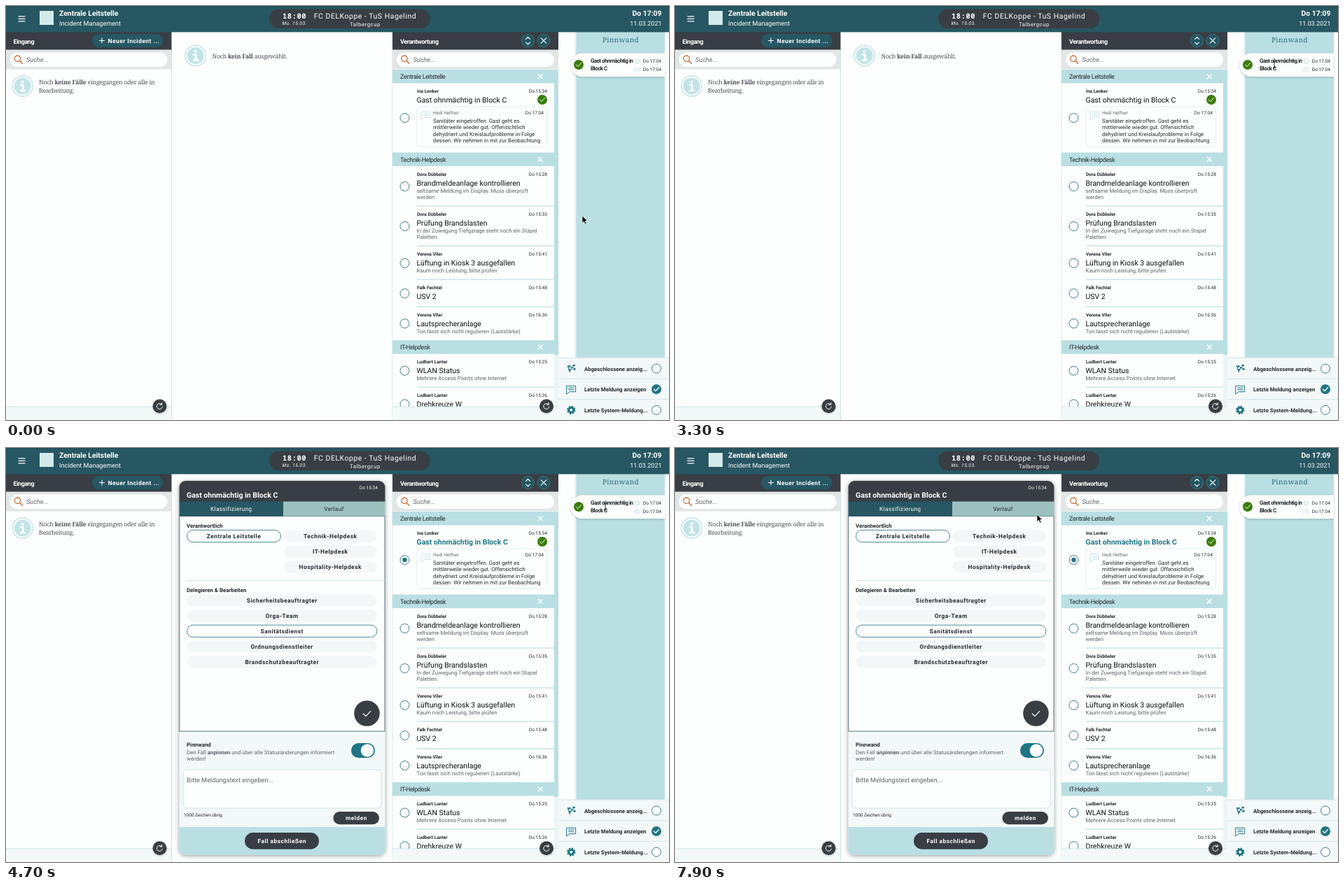
An HTML page that plays this animation: 947x592 px, repeating every 8 s.

```html
<!DOCTYPE html>
<html lang="de">
<head>
<meta charset="utf-8">
<title>Incident Management</title>
<style>
html, body { margin: 0; width: 100%; height: 100%; overflow: hidden; background: #fdfefe; }
svg { display: block; width: 100vw; height: 100vh; font-family: Roboto, Arial, sans-serif; fill: #23292d; text-rendering: geometricPrecision; }
.b { font-weight: 700; }
.i { font-style: italic; }
.m { text-anchor: middle; }
.e { text-anchor: end; }
.w { fill: #fff; }
.g { fill: #5d6468; }
.serif { font-family: "Noto Serif", serif; font-size: 8.7px; letter-spacing: -.24px; fill: #4c5357; }
.head { font-size: 9px; letter-spacing: -.42px; }
.band { font-size: 9px; letter-spacing: -.36px; }
.pin { font-size: 8px; letter-spacing: -.52px; }
.btn { font-size: 8.4px; letter-spacing: .5px; }
.title { font-size: 10.5px; fill: #0c0f11; }
.text { font-size: 7.85px; }
.small { font-size: 6.6px; }
.line { fill: none; stroke-linecap: round; stroke-linejoin: round; }
.sh { filter: drop-shadow(0 1px 1.5px rgba(0, 0, 0, .2)); }
.deep { filter: drop-shadow(0 1.5px 3px rgba(0, 0, 0, .4)); }

.before, .after, .first, .full, .body, .arrow, .beam { animation: 8s step-end infinite; }
.before { animation-name: before; }
.after { animation-name: after; }
.first { animation-name: first; }
.full { animation-name: full; }
.body { animation-name: body; }
.beam { animation-name: beam; }
.arrow { animation-name: move, arrow; }
@keyframes before { 0% { visibility: visible } 56.25%, 100% { visibility: hidden } }
@keyframes after { 0% { visibility: hidden } 56.25%, 100% { visibility: visible } }
@keyframes first { 0% { visibility: hidden } 56.25% { visibility: visible } 58.75%, 100% { visibility: hidden } }
@keyframes full { 0% { visibility: hidden } 58.75%, 100% { visibility: visible } }
@keyframes body { 0% { transform: none } 58.75%, 100% { transform: translateY(21px) } }
@keyframes beam { 0% { visibility: hidden } 31.25% { visibility: visible } 81.25%, 100% { visibility: hidden } }
@keyframes arrow { 0% { visibility: visible } 31.25% { visibility: hidden } 81.25%, 100% { visibility: visible } }
@keyframes move {
  0% { transform: translate(823px, 300px) }
  16.25% { transform: translate(823px, 300px); animation-timing-function: steps(5) }
  28.75% { transform: translate(859px, 78px) }
  81.25% { transform: translate(840px, 100px) }
  83.75% { transform: translate(806px, 125px); animation-timing-function: steps(3) }
  91.25% { transform: translate(640px, 160px); animation-timing-function: steps(3) }
  98.75%, 100% { transform: translate(517px, 95px) }
}
</style>
</head>
<body>
<svg id="stage" viewBox="0 0 947 592" preserveAspectRatio="none"></svg>
<script>
const TEAL = '#1f7585', DEEP = '#275762', DARK = '#383e43', PALE = '#badfe2', MIST = '#f3f8f8', WHITE = '#fdfefe', GREEN = '#3a7d0b';

const text = (x, y, s, cls, size) =>
  `<text x="${x}" y="${y}" class="${cls}"${size ? ` style="font-size:${size}px"` : ''}>${s}</text>`;
const box = (x, y, x2, y2, fill, r = 0, more = '') =>
  `<rect x="${x}" y="${y}" width="${x2 - x}" height="${y2 - y}" rx="${r}" fill="${fill}" ${more}/>`;
const disc = (x, y, r, fill, stroke = 'none', w = 1) =>
  `<circle cx="${x}" cy="${y}" r="${r}" fill="${fill}" stroke="${stroke}" stroke-width="${w}"/>`;
const line = (d, color, w = 1) => `<path class="line" d="${d}" stroke="${color}" stroke-width="${w}"/>`;
const group = (cls, ...parts) => `<g class="${cls}">${parts.join('')}</g>`;

const radio = (x, y) => disc(x, y, 6.5, WHITE, '#3b808c');
const tick = (x, y, k, w = 1) => line(`M${x - 4 * k} ${y}l${2.8 * k} ${2.8 * k}l${5.2 * k} ${-5.6 * k}`, '#fff', w);
const cross = (x, y, r, w) => line(`M${x - r} ${y - r}l${2 * r} ${2 * r}m0 ${-2 * r}l${-2 * r} ${2 * r}`, '#fff', w);
const done = (x, y) => disc(x, y, 7, GREEN) + tick(x, y, .9);

const search = (x, x2) =>
  box(x - 6, 62.5, x2 + 6, 90.5, '#e2e6e7') + box(x, 66.5, x2, 87, WHITE, 10) +
  disc(x + 11, 75.2, 4.2, 'none', '#c96f3d', 1.3) + line(`M${x + 14.3} 78.5l3.6 3.8`, '#c96f3d', 1.5) +
  text(x + 23.5, 80, 'Suche...', 'i g', 9.2);

const reload = x => group('sh', disc(x, 572.3, 10, DARK)) +
  line(`M${x + 2.8} 569.7a4 4 0 1 0 1 3.6m-.6 -6v2.8h-2.8`, '#fff');

const info = (x, y) =>
  disc(x, y, 14.6, WHITE, '#c9e7e9', 1.6) + disc(x, y, 12, '#c3e4e7') +
  disc(x, y - 6, 1.9, '#fff') + line(`M${x - 2.5} ${y - 1.5}h3v8m-3 0h6`, '#fff', 2.6);

const chat = (x, y, k, color, w = 1) =>
  line(`M${x - 6 * k} ${y - 5 * k}h${12 * k}v${8 * k}h${-8 * k}l${-4 * k} ${3 * k}z` +
    `M${x - 3.5 * k} ${y - 2.3 * k}h${7 * k}m0 ${2.5 * k}h${-7 * k}`, color, w);

const band = (y, s) => box(552, y, 789, y + 19.5, PALE) + text(563, y + 13, s, 'band') + cross(763.3, y + 9.8, 3, 1.3);

const entry = (y, ry, name, time, title, ...lines) =>
  radio(569.5, ry) + text(587, y + 2.4, name, 'b small') + text(773, y + 2.4, time, 'small e') +
  text(586.5, y + 16.3, title, 'title') +
  lines.map((s, n) => text(586.5, y + 26.6 + 9.2 * n, s, 'text g')).join('');

const header =
  box(0, 0, 947, 37.4, DEEP) + box(0, 0, 947, 1.5, '#214d58') +
  line('M18 14.8h9m-9 3.5h9m-9 3.5h9', '#fff', 1.2) +
  box(48, 7, 68, 27, '#d3eaec') +
  text(76, 14, 'Zentrale Leitstelle', 'b w', 10.4) + text(76, 27.8, 'Incident Management', 'w', 9.07) +
  box(376, 4.5, 606, 32, DARK, 13.7) +
  `<text x="395" y="18.3" class="b w" style="font:700 10.4px 'Noto Sans Mono',monospace;letter-spacing:.6px">18:00</text>` +
  `<text x="394.5" y="26.6" class="i w" style="font-size:6.8px;letter-spacing:.4px">Mo. 15.03.</text>` +
  `<text x="513" y="18" class="m w" style="font-size:10.5px;letter-spacing:.5px">FC DELKoppe - TuS Hagelind</text>` +
  `<text x="513" y="28.6" class="m w" style="font-size:7.8px;letter-spacing:.55px">Talbergcup</text>` +
  text(936.5, 14, 'Do 17:09', 'b w e', 10.4) + text(936.5, 27.8, '11.03.2021', 'w e', 9);

const inbox =
  box(0, 37, 236.5, 63, DARK) + text(10.5, 53.5, 'Eingang', 'head b w') +
  box(123, 40, 224.5, 59.3, '#265763', 9.6) + line('M133.5 49.5h7m-3.5 -3.5v7', '#fff', 1.1) +
  `<text x="145.5" y="52.6" class="b w" style="font-size:8.6px;letter-spacing:.4px">Neuer Incident ...</text>` +
  search(5.5, 230.5) + info(23.7, 114.5) +
  text(47, 111.8, 'Noch <tspan class="b">keine Fälle</tspan> eingegangen oder alle in', 'serif') +
  text(47, 123.9, 'Bearbeitung.', 'serif') +
  box(0, 573, 236.5, 592, MIST) + box(0, 572.5, 236.5, 573.5, '#cfe7e9') +
  box(236, 63, 237, 592, '#cfe3e5') + reload(219.5);

const empty = group('before', info(270.7, 71),
  text(294.5, 74.5, 'Noch <tspan class="b">kein Fall</tspan> ausgewählt.', 'serif'));

const note = ['Sanitäter eingetroffen. Gast geht es', 'mittlerweile wieder gut. Offensichtlich',
  'dehydriert und Kreislaufprobleme in Folge', 'dessen. Wir nehmen in mit zur Beobachtung'];

const duty =
  box(552, 37, 789, 592, WHITE) + box(551.5, 63, 552.3, 592, '#cfe3e5') +
  band(91, 'Zentrale Leitstelle') +
  radio(569.5, 160) + text(587, 124.4, 'Ina Lenker', 'b small') + text(773, 124.4, 'Do 15:34', 'small e') +
  group('before', text(586.5, 138.3, 'Gast ohnmächtig in Block C', 'title')) +
  group('after', text(586.5, 138.3, `<tspan fill="${TEAL}">Gast ohnmächtig in Block C</tspan>`, 'title b'), disc(569.5, 160, 3.2, TEAL)) +
  done(766, 134) + box(587, 144, 772.5, 201, WHITE, 4, 'stroke="#def0f2"') +
  chat(599.5, 156.5, 1, '#c6e6e9') +
  text(610, 154.8, 'Hedi Helfner', 'small g') + text(768, 154.8, 'Do 17:04', 'small e') +
  note.map((s, n) => text(610, 167 + 9.25 * n, s, 'text')).join('') +
  band(209.5, 'Technik-Helpdesk') +
  entry(240.5, 258, 'Dora Dübbeler', 'Do 15:28', 'Brandmeldeanlage kontrollieren', 'seltsame Meldung im Display. Muss überprüft', 'werden') +
  entry(297.5, 315, 'Dora Dübbeler', 'Do 15:35', 'Prüfung Brandslasten', 'In der Zuwegung Tiefgarage steht noch ein Stapel', 'Paletten.') +
  entry(354.8, 367.7, 'Verena Viler', 'Do 15:41', 'Lüftung in Kiosk 3 ausgefallen', 'Kaum noch Leistung, bitte prüfen') +
  entry(403, 411, 'Falk Fechtel', 'Do 15:48', 'USV 2') +
  entry(441.7, 454, 'Verena Viler', 'Do 16:36', 'Lautsprecheranlage', 'Ton lässt sich nicht regulieren (Lautstärke)') +
  band(478, 'IT-Helpdesk') +
  entry(508.7, 521.5, 'Ludbert Lanter', 'Do 15:25', 'WLAN Status', 'Mehrere Access Points ohne Internet') +
  entry(556.7, 569.3, 'Ludbert Lanter', 'Do 15:26', 'Drehkreuze W') +
  [286, 343, 391, 430, 545].map(y => box(587, y - .7, 783, y + .7, '#c9e6e9')).join('') +
  box(783, 91, 789, 499, PALE) + box(783, 499, 789, 573, '#eaf5f6') +
  box(552, 573, 789, 592, MIST) + box(552, 572.5, 789, 573.5, '#cfe7e9') + reload(772) +
  box(552, 37, 789, 63, DARK) + text(563, 53.5, 'Verantwortung', 'head b w') +
  disc(745.5, 49.5, 9, '#235560', '#3b7682') + line('M742.5 47.3l3 -3l3 3m-6 4.5l3 3l3 -3', '#fff', 1.2) +
  disc(768, 49.5, 9, '#235560', '#3b7682') + cross(768, 49.5, 3.7, 1.2) +
  search(558, 783);

// Two rows of alternating squares on a slanted pole
const flag = line('M802.3 514.5l3 9', TEAL, 1.2) +
  '<g transform="rotate(-10 808 517)">' +
  [0, 1, 2, 3, 4, 5, 6, 7, 8].map(n => {
    const x = 803.6 + n % 3 * 3.2, y = 513.4 + (n / 3 | 0) * 2.6;
    return n % 2 ? '' : box(x, y, x + 3.2, y + 2.6, TEAL);
  }).join('') + '</g>';
const gear = disc(807.3, 577.7, 3.5, 'none', TEAL, 3) +
  `<circle cx="807.3" cy="577.7" r="5.4" fill="none" stroke="${TEAL}" stroke-width="1.7" stroke-dasharray="2.12 2.12"/>`;

const pins =
  box(789, 37, 947, 592, WHITE) + box(812, 37, 816, 503, 'url(#edge)') + box(815.5, 37, 941, 503, PALE) +
  `<text x="878" y="51.5" class="m" style="font:10px 'Noto Serif',serif;letter-spacing:.4px;fill:#2a6875">Pinnwand</text>` +
  group('sh', `<path d="M941 67.5H823a16.7 16.7 0 0 0 0 33.4H941z" fill="${WHITE}"/>`) + done(818, 84) +
  text(835, 81.2, 'Gast ohnmächtig in', 'pin b') + text(835, 91.7, 'Block C', 'pin b') +
  disc(901.5, 79, 3, 'none', '#b5dfe3') + chat(901.7, 91, .6, '#cfe9eb', .8) +
  text(936, 81, 'Do 17:04', 'small e') + text(936, 93, 'Do 17:04', 'small e') +
  box(789, 503, 947, 592, MIST) + [503, 533, 562.5].map(y => box(789, y - .5, 947, y + .5, '#d5e7e9')).join('') +
  flag + chat(807.3, 548.5, 1.05, TEAL) + gear +
  text(826, 521.7, 'Abgeschlossene anzeig...', 'b', 7.8) + text(826, 551.2, 'Letzte Meldung anzeigen', 'b', 7.8) +
  text(826, 580.7, 'Letzte System-Meldung...', 'b', 7.8) +
  radio(929, 518.5) + disc(929, 548, 7, TEAL) + tick(929, 548, .9, 1.2) + radio(929, 577.7);

const pill = (x, x2, y, s, on) =>
  box(x, y - 8.6, x2, y + 8.6, on ? WHITE : '#f4f7f8', 8.6, on ? 'stroke="#3b808c" stroke-width=".9"' : '') +
  text((x + x2) / 2, y + 3, s, 'btn b m');
const wide = ['Sicherheitsbeauftragter', 'Orga-Team', 'Sanitätsdienst', 'Ordnungsdienstleiter', 'Brandschutzbeauftragter'];
const confirm = y => disc(515.5, y, 18.3, DARK) + tick(515.5, y + .5, 1.3, 1.2);
const frame = (y, y2) => box(247.8, y, 541, y2, WHITE, 0, 'stroke="#4a666d" stroke-width=".9"');

const panel = group('after',
  group('deep', box(247.5, 47, 541.5, 582, MIST, 9)),
  `<path d="M247.5 77V56a9 9 0 0 1 9-9H532.5a9 9 0 0 1 9 9V77z" fill="${DARK}"/>`,
  `<path d="M247.5 542H541.5V573a9 9 0 0 1-9 9H256.5a9 9 0 0 1-9-9z" fill="${PALE}"/>`,
  text(531, 58.7, 'Do 15:34', 'small w e'),
  group('first', text(258, 71, 'Gast ohnmächtig in Block C', 'b w', 11.2),
    box(247.5, 455, 541.5, 521, WHITE), frame(77, 414), confirm(388.5)),
  group('full', text(258, 70.5, 'Gast ohnmächtig in Block C', 'b w', 10.5),
    frame(97.5, 405), box(247.5, 76.5, 396, 97.5, DEEP), box(396, 76.5, 541.5, 97.5, '#9cc0be'),
    `<g style="font-size:8.4px;letter-spacing:.3px">${text(321.7, 90.2, 'Klassifizierung', 'm w')}${text(468.5, 90.2, 'Verlauf', 'm')}</g>`,
    confirm(379.5),
    text(258, 426.8, 'Pinnwand', 'text b'),
    text(258, 437.6, 'Den Fall <tspan class="b">anpinnen</tspan> und über alle Statusänderungen informiert', 'text g'),
    text(258, 446.8, 'werden!', 'text g'),
    box(493, 422, 527, 443, TEAL, 10.5), disc(516, 432.5, 9.3, WHITE),
    box(253, 460, 536, 515, WHITE, 6, 'stroke="#cbe6e9"'),
    text(258, 478.3, 'Bitte Meldungstext eingeben...', 'g', 9.2)),
  group('body',
    text(258, 93.4, 'Verantwortlich', 'text b'),
    pill(258.5, 392.5, 105, 'Zentrale Leitstelle', true), pill(396.5, 530, 105, 'Technik-Helpdesk'),
    pill(396.5, 530, 127, 'IT-Helpdesk'), pill(396.5, 530, 149, 'Hospitality-Helpdesk'),
    box(258, 168, 541, 169.2, '#d3e7e9'),
    text(258, 185.4, 'Delegieren &amp; Bearbeiten', 'text b'),
    ...wide.map((s, n) => pill(258.5, 530, 197 + 21.9 * n, s, n === 2))),
  text(254, 527, '1000 Zeichen übrig', 'small', 6.45),
  box(467.5, 520, 533, 538.2, DARK, 9), text(500.5, 532.2, 'melden', 'btn b m w'),
  box(341, 550, 447, 573.7, DARK, 11.8), text(394.3, 565, 'Fall abschließen', 'btn b m w'));

const cursor =
  group('arrow', '<path d="M0 0v10.5l2.5-2.3 1.9 4 1.8-.8-1.8-3.9h3.3z" fill="#000" stroke="#fff" stroke-width=".7"/>') +
  group('beam', line('M854.3 79.3q1.7 0 1.7 1.4v7q0 1.4 -1.7 1.4m3.4 -9.8q-1.7 0 -1.7 1.4m0 7q0 1.4 1.7 1.4', '#111', .9));

document.getElementById('stage').innerHTML =
  `<defs><linearGradient id="edge"><stop stop-color="${WHITE}"/><stop offset="1" stop-color="#b2d8dc"/></linearGradient></defs>` +
  inbox + empty + panel + duty + pins + header + cursor;
</script>
</body>
</html>
```
